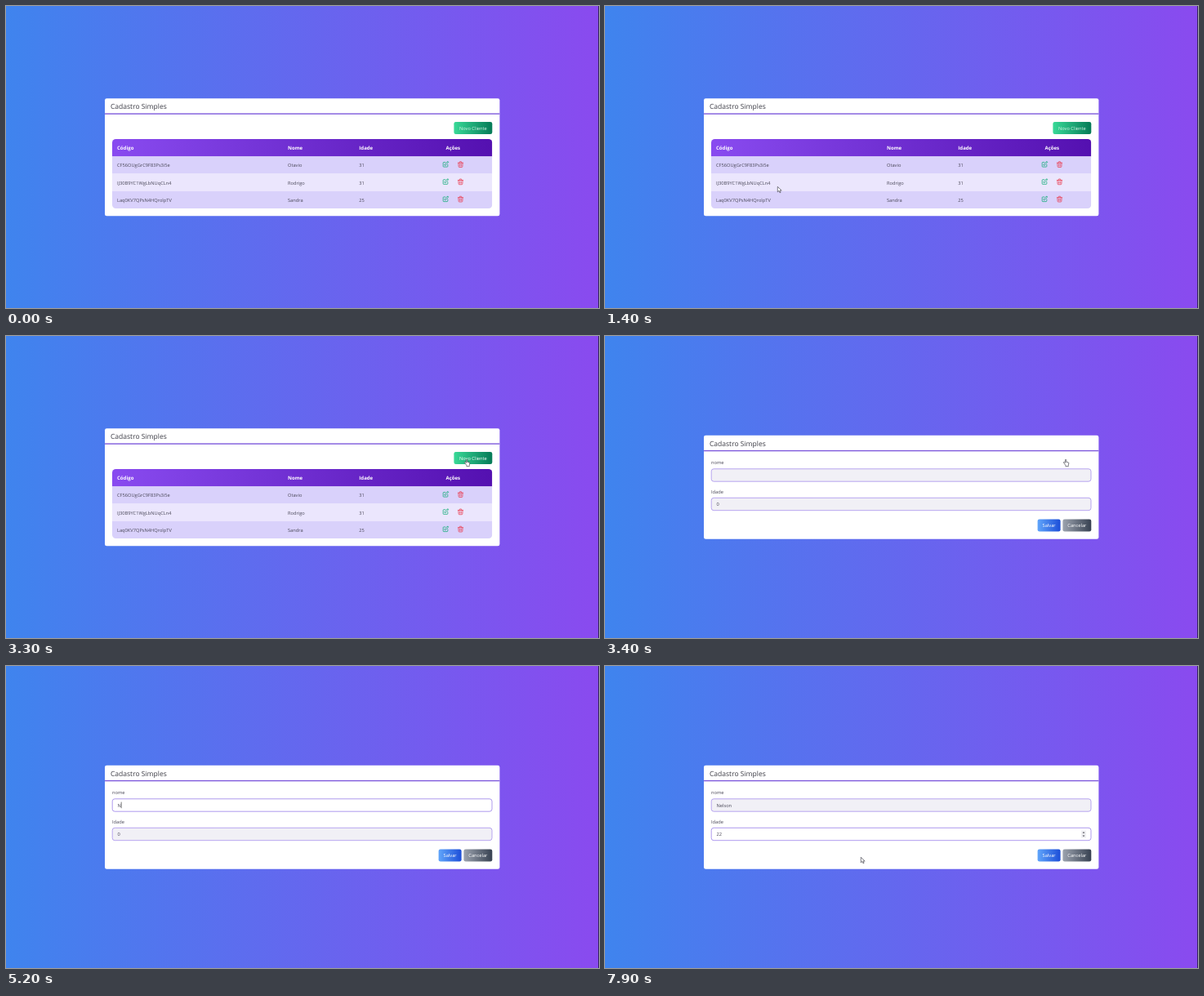
Write an HTML page that moves like this. It is 726x370 px and loops after 8 s.

```html
<!DOCTYPE html>
<html lang="pt-BR">
<head>
<meta charset="utf-8">
<title>Cadastro Simples</title>
<style>
  html, body { margin: 0; width: 100%; height: 100%; overflow: hidden; }
  svg { display: block; width: 726px; height: 370px; }
  text { font: 5.69px "Open Sans", "Noto Sans", sans-serif; fill: #4a4858; text-rendering: geometricPrecision; }
  .title { font-size: 8.52px; fill: #3d3d46; }
  .head { font-size: 6.05px; font-weight: 700; fill: #fff; }
  .button { fill: #fff; text-anchor: middle; }
  .middle { text-anchor: middle; }
  .field { fill: #f1f0f6; stroke: #a891ee; stroke-width: .8; }
  .field.focused { fill: #fff; stroke: #9a80ea; }
  .icon { fill: none; stroke-width: 2; stroke-linecap: round; stroke-linejoin: round; }
  .caret { fill: #222; }
  .pointer { fill: #fff; stroke: #3b3b46; stroke-width: .65; stroke-linejoin: round; }
</style>
</head>
<body>
<svg id="stage" viewBox="0 0 726 370">
  <defs id="defs">
    <clipPath id="tableClip"><rect x="130" y="163" width="465.3" height="85" rx="4.5"/></clipPath>
    <path id="pencil" d="M11 5H6a2 2 0 00-2 2v11a2 2 0 002 2h11a2 2 0 002-2v-5m-1.414-9.414a2 2 0 112.828 2.828L11.828 15H9v-2.828l8.586-8.586z"/>
    <path id="trash" d="M19 7l-.867 12.142A2 2 0 0116.138 21H7.862a2 2 0 01-1.995-1.858L5 7m5 4v6m4-6v6m1-10V4a1 1 0 00-1-1h-4a1 1 0 00-1 1v3M4 7h16"/>
  </defs>
  <rect width="726" height="370" fill="url(#page)"/>
  <rect x="725" width="1" height="370" fill="#35245e"/>
  <g id="list"></g>
  <g id="form"></g>
  <g id="cursor">
    <path id="arrow" class="pointer" d="M.3.3V6.9L1.9 5.4 3 7.8 4.1 7.3 3 5H5.2Z"/>
    <path id="hand" class="pointer" d="M-.9 6.2-2.5 4.4C-3 3.7-2.1 3-1.5 3.6L-.6 4.4V.9C-.6 0 .7 0 .7.9V3.3L3 3.8C3.7 4 3.9 4.3 3.8 5L3.3 7.4V8.7H-.1V7.6Z"/>
    <path id="beam" fill="none" stroke="#333" stroke-width=".6" d="M-1.3-3.6H1.3M0-3.6V3.6M-1.3 3.6H1.3"/>
  </g>
</svg>
<script>
const LOOP = 8000;
const $ = id => document.getElementById(id);

const gradients = {
  page: ['#3f84ee', '#8a4aef'],
  header: ['#894bf0', '#5410b0'],
  green: ['#38d997', '#057a57'],
  blue: ['#60a5fa', '#1d4ed8'],
  gray: ['#9ca3af', '#374151']
};
for (const [id, [from, to]] of Object.entries(gradients)) {
  $('defs').innerHTML +=
    `<linearGradient id="${id}"><stop stop-color="${from}"/><stop offset="1" stop-color="${to}"/></linearGradient>`;
}

const text = (x, y, label, cls = '', id = '') =>
  `<text x="${x}" y="${y}" class="${cls}" id="${id}">${label}</text>`;
const box = (x, y, w, h, fill, rx = 0) =>
  `<rect x="${x}" y="${y}" width="${w}" height="${h}" rx="${rx}" fill="${fill}"/>`;
const card = (y, h) =>
  box(121, y, 483.4, h, '#fff', 2.3) + box(121, y + 18.2, 483.4, 1.4, '#7f5bdc') +
  text(128, y + 12.9, 'Cadastro Simples', 'title');
const button = (x, y, w, label, fill, id) =>
  box(x, y, w, 15, `url(#${fill})`, 2.3) + text(x + w / 2, y + 9.7, label, 'button', id);
const icon = (name, x, y, color) =>
  `<use href="#${name}" class="icon" stroke="${color}" transform="translate(${x - 4.54} ${y - 4.54}) scale(.378)"/>`;
const field = (id, y) =>
  `<rect id="${id}Field" class="field" x="130.2" y="${y}" width="464.8" height="15.4" rx="3"/>`;

const clients = [
  ['CF56OUgGrC9F83Ps3i5e', 'Otavio', 31],
  ['IJ30B9YC1WgLbNUqCLn4', 'Rodrigo', 31],
  ['Laq0KV7QPsN4HQrolpTV', 'Sandra', 25]
];

const row = ([code, name, age], i) => {
  const y = 184.3 + i * 21.25;
  return box(130, y, 465.3, 21.3, i % 2 ? '#ebe6fd' : '#d9d1fb') +
    text(136, y + 13, code) + text(345, y + 13, name) + text(432.3, y + 13, age) +
    icon('pencil', 538.2, y + 9.8, '#14ad7a') + icon('trash', 556.5, y + 9.8, '#ea3c50');
};

$('list').innerHTML = card(113.2, 144) +
  button(548.4, 142, 46.9, 'Novo Cliente', 'green', 'newLabel') +
  '<g clip-path="url(#tableClip)">' + box(130, 163, 465.3, 21.4, 'url(#header)') +
  clients.map(row).join('') + '</g>' +
  text(136, 176.2, 'Código', 'head') + text(345, 176.2, 'Nome', 'head') +
  text(432.3, 176.2, 'Idade', 'head') + text(547.3, 176.2, 'Ações', 'head middle');

$('form').innerHTML = card(121.7, 127) +
  text(130, 157.2, 'nome') + field('name', 162.8) +
  text(130, 192.8, 'Idade') + field('age', 198.3) +
  '<rect id="selection" x="136.2" y="201.4" width="3.6" height="9.2" fill="#2f86ec"/>' +
  text(136.5, 172.7, '', '', 'nameText') + text(136.5, 208.2, '', '', 'ageText') +
  '<g id="spinner">' + box(583, 201.6, 6, 9, '#efeff2') +
  '<path d="M584.6 204.8 586 203 587.4 204.8ZM584.6 207.4 586 209.2 587.4 207.4Z" fill="#55555c"/></g>' +
  '<rect id="caret" class="caret" width=".6" height="7.6"/>' +
  button(529.6, 224.5, 28, 'Salvar', 'blue', '') +
  button(560.4, 224.5, 34.9, 'Cancelar', 'gray', '');

// Every table is [time, ...values], held until the next entry.
const pointer = [
  [0], [100, 654, 77, 'arrow'], [200, 648, 118, 'arrow'], [300, 636, 165, 'arrow'],
  [400, 615, 207, 'arrow'], [500, 599, 231, 'arrow'],
  [700, 596, 243, 'arrow'], [800, 540, 249, 'arrow'], [900, 430, 245, 'arrow'],
  [1000, 300, 234, 'arrow'], [1100, 200, 205, 'arrow'], [1200, 146, 170, 'arrow'],
  [1300, 165, 200, 'arrow'], [1400, 211, 221, 'arrow'], [1500, 205, 214, 'arrow'],
  [1600, 180, 180, 'arrow'], [1700, 150, 142, 'arrow'], [1800, 138, 121, 'arrow'],
  [1900, 180, 122, 'arrow'], [2000, 250, 130, 'arrow'], [2100, 340, 142, 'arrow'],
  [2200, 430, 155, 'arrow'], [2300, 505, 164, 'arrow'], [2400, 543, 167, 'arrow'],
  [2500, 552, 162, 'arrow'], [2600, 560, 155, 'hand'], [2700, 565, 153, 'hand'],
  [2800, 564, 151, 'hand'],
  [3500, 515, 153, 'arrow'], [3600, 410, 158, 'arrow'], [3700, 290, 169, 'beam'],
  [3800, 210, 171, 'beam'], [3900, 182, 171, 'beam'], [4000, 180, 171, 'beam'],
  [4300, 180, 174, 'beam'], [4400, 179, 183, 'arrow'], [4500, 179, 200, 'beam'],
  [4600, 178, 218, 'arrow'], [4700, 178, 234, 'arrow'], [4800, 178, 242, 'arrow'],
  [4900], [7900, 313, 234, 'arrow']
];
const nameKeys = [[0, 0], [5200, 1], [5300, 2], [5500, 3], [5600, 4], [5700, 5], [5900, 6]];
const ageKeys = [[0, '0'], [7300, '2'], [7400, '22']];
const focusSteps = [[0, ''], [3900, 'name'], [6300, 'age']];
const at = (steps, t) => steps.findLast(step => step[0] <= t);
const show = (id, on) => $(id).setAttribute('visibility', on ? 'inherit' : 'hidden');

function draw(t) {
  const formOpen = t >= 3400;
  show('list', !formOpen);
  show('form', formOpen);

  const [, x = 0, y = 0, shape] = at(pointer, t);
  $('cursor').setAttribute('transform', `translate(${x} ${y})`);
  for (const id of ['arrow', 'hand', 'beam']) show(id, id === shape);
  $('newLabel').style.fill = shape === 'hand' ? '#fff' : '#d8f5e8';

  const [focusTime, focus] = at(focusSteps, t);
  const nameKey = at(nameKeys, t), ageKey = at(ageKeys, t);
  $('nameText').textContent = 'Nelson'.slice(0, nameKey[1]);
  $('ageText').textContent = ageKey[1];
  for (const id of ['name', 'age']) $(id + 'Field').classList.toggle('focused', id === focus);

  const selected = focus === 'age' && ageKey[0] === 0;
  show('selection', formOpen && selected);
  show('spinner', formOpen && focus === 'age');
  $('ageText').style.fill = selected ? '#fff' : '';

  // The caret restarts its half-second blink on focus and on each key.
  const lastKey = Math.max(focusTime, focus === 'age' ? ageKey[0] : nameKey[0]);
  const blinkOn = Math.floor((t - lastKey) / 500) % 2 === 0;
  show('caret', focus && !selected && blinkOn);
  if (focus) {
    $('caret').setAttribute('x', 136.5 + $(focus + 'Text').getComputedTextLength());
    $('caret').setAttribute('y', focus === 'name' ? 166.6 : 202.1);
  }
}

const start = performance.now();
function tick() {
  draw((performance.now() - start) % LOOP);
  requestAnimationFrame(tick);
}
tick();
</script>
</body>
</html>
```
